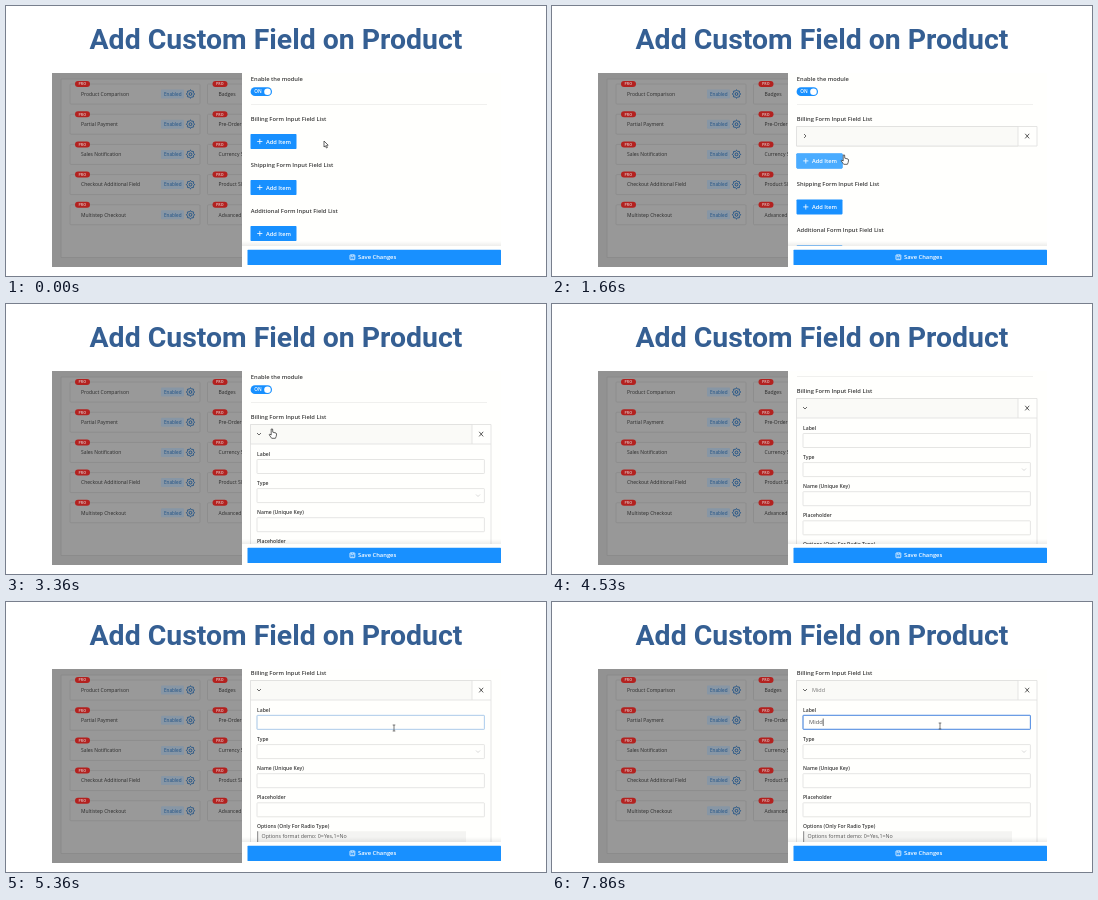
Recreate the animation shown at these times as an HTML page with a canvas. Size 540 px wide and 270 px high, loop 8 s.

```html
<!DOCTYPE html>
<html lang="en">
<head>
<meta charset="utf-8">
<title>Add Custom Field on Product</title>
<style>
html, body { margin: 0; width: 100%; height: 100%; overflow: hidden; background: #fff; }
canvas { display: block; width: 540px; height: 270px; }
</style>
</head>
<body>
<canvas id="stage"></canvas>
<script>
const canvas = document.getElementById('stage');
const ctx = canvas.getContext('2d');
const ratio = window.devicePixelRatio || 1;
canvas.width = 540 * ratio;
canvas.height = 270 * ratio;

const LOOP = 8000;
const SANS = '"Open Sans", "Noto Sans", sans-serif';
const BLUE = '#1890ff', HOVER = '#4aacff', PRESSED = '#0a6ad4';
const BORDER = '#dfdfdd', INK = '#3a3a3a';

const POINTER = [
  [60, 318, 135], [330, 284, 138], [1330, 284, 138], [1360, 292, 149],
  [2400, 292, 149], [2660, 253, 125], [2830, 253, 125], [2960, 266, 125],
  [3660, 266, 125], [4030, 501, 131], [4900, 501, 131], [5200, 388, 126],
  [5500, 388, 126], [5760, 388, 124]
];
const SCROLL = [[4529, 0], [4530, 26], [4560, 26], [4860, 42]];
const EXPAND = [[2900, 0], [2960, 2], [3130, 2], [3360, 230]];
const TYPING = [
  [0, ''], [6030, 'mi'], [6660, 'm'], [6830, ''],
  [7200, 'M'], [7600, 'Mi'], [7830, 'Mid'], [7860, 'Midd']
];
const MODULES = [
  ['Product Comparison', 'Badges'],
  ['Partial Payment', 'Pre-Order'],
  ['Sales Notification', 'Currency Switcher'],
  ['Checkout Additional Field', 'Product Slider'],
  ['Multistep Checkout', 'Advanced Search']
];

const progress = (t, from, to) => Math.min(1, Math.max(0, (t - from) / (to - from)));
const smooth = p => p * p * (3 - 2 * p);

// Eased values of a keyframe track at time t.
function sample(track, t) {
  let i = 0;
  while (i < track.length - 1 && t >= track[i + 1][0]) i++;
  const a = track[i], b = track[Math.min(i + 1, track.length - 1)];
  const p = a === b ? 0 : smooth(progress(t, a[0], b[0]));
  return a.slice(1).map((v, k) => v + (b[k + 1] - v) * p);
}

function rect(x, y, w, h, fill, stroke, radius = 0) {
  ctx.beginPath();
  ctx.roundRect(x, y, w, h, radius);
  if (fill) { ctx.fillStyle = fill; ctx.fill(); }
  if (stroke) { ctx.strokeStyle = stroke; ctx.lineWidth = 0.8; ctx.stroke(); }
}

function path(points, color, width = 0.8) {
  ctx.beginPath();
  points.forEach(([x, y], i) => i ? ctx.lineTo(x, y) : ctx.moveTo(x, y));
  ctx.strokeStyle = color;
  ctx.lineWidth = width;
  ctx.stroke();
}

function text(str, x, y, size, color = INK, weight = 400, family = SANS) {
  ctx.font = `${weight} ${size}px ${family}`;
  ctx.fillStyle = color;
  ctx.fillText(str, x, y);
}

function clipped(x, y, w, h, draw) {
  ctx.save();
  ctx.beginPath();
  ctx.rect(x, y, w, h);
  ctx.clip();
  draw();
  ctx.restore();
}

function chevron(x, y, angle, color) {
  ctx.save();
  ctx.translate(x, y);
  ctx.rotate(angle);
  path([[-1, -2], [1, 0], [-1, 2]], color);
  ctx.restore();
}

function gear(x, y) {
  ctx.beginPath();
  for (let i = 0; i <= 48; i++) {
    const a = i * Math.PI / 24;
    const r = 3.6 + 0.5 * Math.cos(a * 8);
    ctx.lineTo(x + r * Math.cos(a), y + r * Math.sin(a));
  }
  ctx.strokeStyle = '#1d5288';
  ctx.lineWidth = 1;
  ctx.stroke();
  ctx.beginPath();
  ctx.arc(x, y, 1.4, 0, 7);
  ctx.stroke();
}

function moduleCard(x, y, name) {
  rect(x, y - 10, 130, 20, '#999999', '#8b8b8b', 1);
  rect(x + 5, y - 13, 15, 6, '#b3211f', null, 3);
  text('PRO', x + 8.6, y - 8.6, 3.6, '#d9b0b0', 700);
  text(name, x + 11, y + 1.8, 5, '#2b2b2b');
  rect(x + 91, y - 4.5, 23, 9, '#8796a5', null, 1);
  text('Enabled', x + 94, y + 1.7, 4.65, '#1d5085');
  gear(x + 120.5, y);
}

function dimmedPage() {
  rect(46, 67, 190, 194, '#929292');
  rect(55, 73, 190, 178.5, '#989898', '#8a8a8a');
  MODULES.forEach(([left, right], i) => {
    const y = 88 + i * 30.2;
    moduleCard(64, y, left);
    moduleCard(201.5, y, right);
  });
}

function addButton(y, tint, alpha = 0) {
  rect(244.5, y, 46, 15, BLUE, null, 0.8);
  if (alpha) {
    ctx.globalAlpha = alpha;
    rect(244.5, y, 46, 15, tint, null, 0.8);
    ctx.globalAlpha = 1;
  }
  path([[251.2, y + 7.5], [256.4, y + 7.5]], '#fff');
  path([[253.8, y + 4.9], [253.8, y + 10.1]], '#fff');
  text('Add Item', 260, y + 9.6, 5.7, '#fff', 600);
}

function buttonTint(t) {
  if (t < 630) return [HOVER, progress(t, 200, 330)];
  if (t < 1100) return [PRESSED, 1];
  return [HOVER, 1 - progress(t, 2830, 2960)];
}

const heading = (name, y) => text(name, 244.8, y + 2, 5.75, INK, 600);

function typed(t) {
  return TYPING.filter(([start]) => start <= t).pop();
}

function field(name, y) {
  text(name, 251, y + 1.9, 5.05, INK, 600);
  rect(251, y + 5.3, 227.4, 14, '#fffffd', BORDER, 0.6);
}

function labelInput(t) {
  const hover = progress(t, 5230, 5360), focus = progress(t, 5500, 5760);
  ctx.globalAlpha = hover;
  rect(251, 155.3, 227.4, 14, null, '#a3cbf3', 0.6);
  ctx.globalAlpha = focus;
  rect(251, 155.3, 227.4, 14, null, '#3f7fe0', 0.6);
  ctx.globalAlpha = 1;
  const [start, value] = typed(t);
  text(value, 257, 164.3, 5.8, '#555');
  const since = t - (start || 5530);
  if (since >= 0 && since % 940 < 470) {
    const x = 257.4 + ctx.measureText(value).width;
    path([[x, 158.5], [x, 166]], '#333', 0.7);
  }
}

function itemBody(t, height) {
  clipped(244, 140, 242, height, () => {
    rect(244.5, 140, 240.5, height - 0.5, '#fffffd', BORDER);
    ['Label', 'Type', 'Name (Unique Key)', 'Placeholder'].forEach((name, i) => field(name, 150.2 + i * 29.1));
    chevron(472, 191.5, Math.PI / 2, '#cfcfcf');
    labelInput(t);
    text('Options (Only For Radio Type)', 251, 268.3, 5.05, INK, 600);
    rect(251, 271.3, 209, 12, '#f4f4f2');
    rect(251, 271.3, 1.2, 12, '#999');
    text('Options format demo: 0=Yes,1=No', 255.5, 278.4, 5.3, '#555');
  });
}

function fieldItem(t, height) {
  rect(244.5, 120.5, 240.5, 19.5, '#fffffd', BORDER);
  rect(244.5, 120.5, 221.5, 19.5, '#fafaf7', BORDER);
  chevron(253, 130, progress(t, 3130, 3360) * Math.PI / 2, '#444');
  text(typed(t)[1], 260, 131.9, 5.5, '#777');
  path([[473.2, 127.8], [477.2, 132.4]], '#333');
  path([[477.2, 127.8], [473.2, 132.4]], '#333');
  if (height > 0) itemBody(t, height);
}

function panelContent(t) {
  const hasItem = t >= 760;
  const [height] = sample(EXPAND, t);
  const shift = hasItem ? 19.4 + height : 0;
  ctx.translate(0, -sample(SCROLL, t)[0]);

  heading('Enable the module', 73);
  rect(244.6, 81.3, 21.4, 8.8, BLUE, null, 4.4);
  text('ON', 248.2, 87.4, 4.7, '#fff', 600);
  ctx.beginPath();
  ctx.arc(261.5, 85.7, 3.3, 0, 7);
  ctx.fillStyle = '#fff';
  ctx.fill();
  path([[245, 98.5], [481, 98.5]], '#ededeb');

  heading('Billing Form Input Field List', 113);
  if (hasItem) fieldItem(t, height);
  addButton(128 + shift, ...buttonTint(t));
  heading('Shipping Form Input Field List', 159 + shift);
  addButton(174 + shift);
  heading('Additional Form Input Field List', 205 + shift);
  addButton(220 + shift);
}

function footer() {
  const shade = ctx.createLinearGradient(0, 235, 0, 240);
  shade.addColorStop(0, 'rgba(0,0,0,0)');
  shade.addColorStop(1, 'rgba(0,0,0,0.07)');
  rect(236, 235, 259, 5, shade);
  rect(236, 240, 259, 21, '#fffffd');
  rect(241.5, 243.8, 253.5, 15.2, BLUE, null, 0.6);
  rect(344, 248.9, 4.8, 4.8, null, '#fff', 0.5);
  path([[345.3, 249], [345.3, 250.6], [347.4, 250.6], [347.4, 249]], '#fff', 0.6);
  path([[345.4, 252.2], [347.4, 252.2]], '#fff', 0.6);
  text('Save Changes', 352, 253.4, 5.8, '#fff', 600);
}

function outline(points) {
  ctx.beginPath();
  points.forEach(([x, y]) => ctx.lineTo(x, y));
  ctx.closePath();
  ctx.lineJoin = 'round';
  ctx.fillStyle = '#fff';
  ctx.fill();
  ctx.strokeStyle = '#333';
  ctx.lineWidth = 0.75;
  ctx.stroke();
}

function pointer(t) {
  const [x, y] = sample(POINTER, t);
  ctx.save();
  ctx.translate(x, y);
  if (t >= 5100) {
    path([[-1.3, -3], [1.3, -3]], '#444', 0.7);
    path([[0, -3], [0, 3]], '#444', 0.7);
    path([[-1.3, 3], [1.3, 3]], '#444', 0.7);
  } else if (t >= 230 && t < 4100) {
    outline([[-0.8, 0], [0.6, 0], [0.8, 3.2], [4, 4], [4.6, 5], [4.2, 7.4],
      [3.4, 9.3], [-0.3, 9.3], [-2.8, 5.8], [-2.2, 5], [-0.8, 6]]);
  } else {
    outline([[0, 0], [0, 6], [1.4, 4.8], [2.4, 7], [3.4, 6.5], [2.5, 4.4], [4.2, 4.2]]);
  }
  ctx.restore();
}

function render(t) {
  ctx.setTransform(ratio, 0, 0, ratio, 0, 0);
  rect(0, 0, 540, 270, '#fff');
  text('Add Custom Field on Product', 83.5, 43, 28.4, '#355f93', 700, 'Roboto, sans-serif');
  clipped(46, 67, 449, 194, () => {
    dimmedPage();
    rect(236, 67, 259, 194, '#fffffd');
    clipped(236, 67, 259, 173, () => panelContent(t));
    footer();
    pointer(t);
  });
}

const begin = performance.now();
function frame() {
  render((performance.now() - begin) % LOOP);
  requestAnimationFrame(frame);
}
frame();
</script>
</body>
</html>
```
